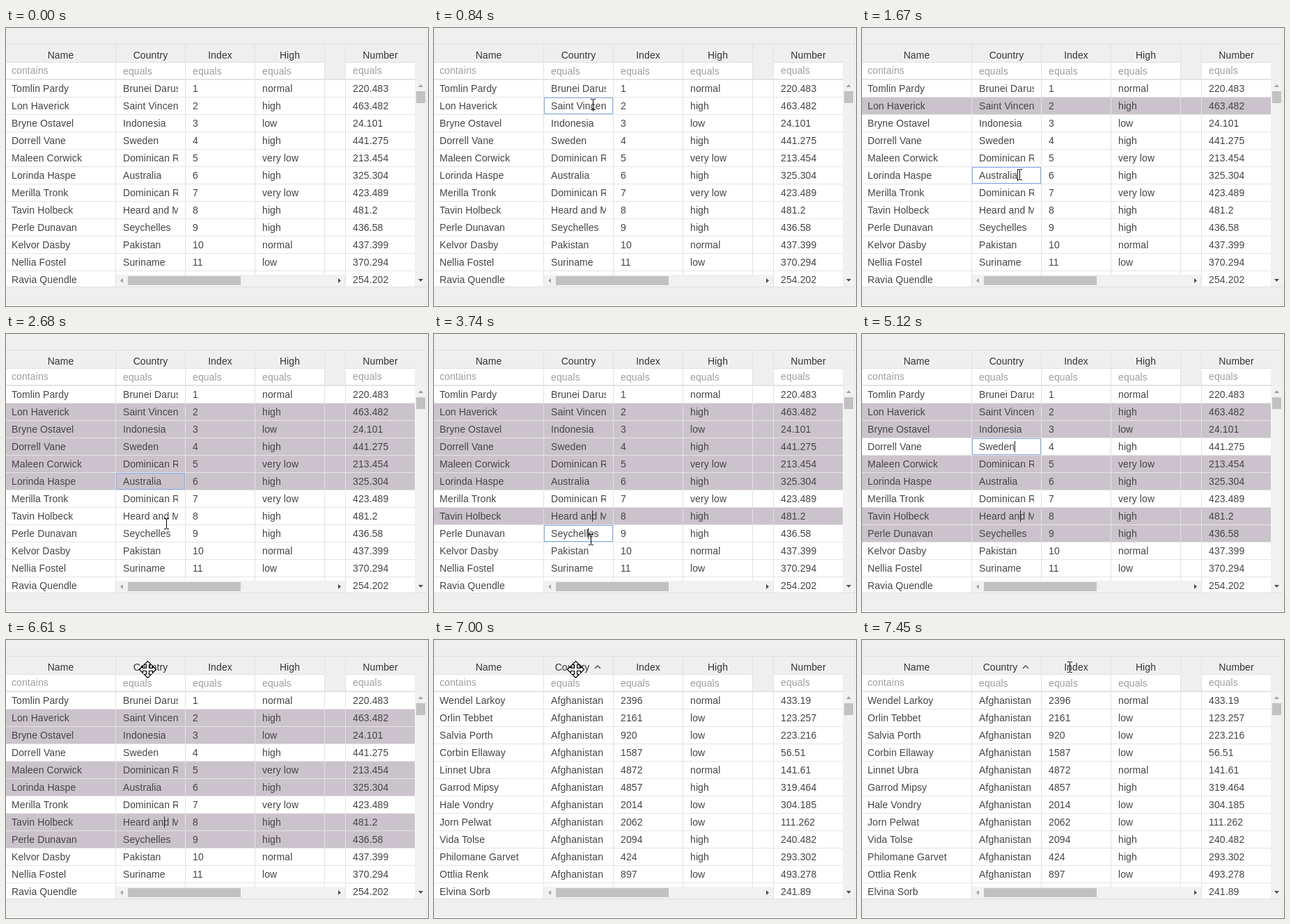
These frames come from a looping animation (606 by 400 pixels, 8000 ms). An HTML page:

```html
<!DOCTYPE html>
<html lang="en">
<head>
<meta charset="utf-8">
<title>Grid row selection</title>
<style>
html, body { margin: 0; width: 100%; height: 100%; overflow: hidden; background: #fff; }
#stage { position: relative; width: 606px; height: 400px; overflow: hidden; background: #fff;
  font: 14px/24px "Liberation Sans", Arial, sans-serif; letter-spacing: .1px; color: #444; cursor: default; }
#stage div, #stage svg { position: absolute; box-sizing: border-box; }
.text { white-space: pre; overflow: hidden; height: 24px; }
.title { text-align: center; color: #333; }
.filter { color: #9a9f9a; }
.row { left: 0; width: 587px; height: 25px; border-bottom: 1px solid #e4e4e4; background: #fff; }
.row.selected { background: #cbc3cc; }
#focus { left: 158px; width: 99px; height: 24px; border: 1px solid #82a9ee; }
.caret { width: 1px; height: 16px; background: #222; }
#move, #beam { overflow: visible; left: 0; top: 0; width: 1px; height: 1px; }
</style>
</head>
<body>
<div id="stage"></div>
<script>
const LOOP = 8000, SORT_AT = 7000, ROW_TOP = 75, ROW_H = 25;
const LINE = '#e0e0e0', PANEL = '#efefef';
const stage = document.getElementById('stage');

const columns = [
  { x: 0, w: 157, pad: 8, title: 'Name', filter: 'contains', filterTop: 49 },
  { x: 158, w: 99, pad: 10, title: 'Country', filter: 'equals', filterTop: 50 },
  { x: 258, w: 99, pad: 10, title: 'Index', filter: 'equals', filterTop: 50 },
  { x: 358, w: 99, pad: 10, title: 'High', filter: 'equals', filterTop: 50 },
  { x: 488, w: 99, pad: 10, title: 'Number', filter: 'equals', filterTop: 49 }
];

const parse = text => text.trim().split('\n').map(line => line.split('|'));
const unsorted = parse(`
Tomlin Pardy|Brunei Darussalam|1|normal|220.483
Lon Haverick|Saint Vincent and the Grenadines|2|high|463.482
Bryne Ostavel|Indonesia|3|low|24.101
Dorrell Vane|Sweden|4|high|441.275
Maleen Corwick|Dominican Republic|5|very low|213.454
Lorinda Haspe|Australia|6|high|325.304
Merilla Tronk|Dominican Republic|7|very low|423.489
Tavin Holbeck|Heard and McDonald Islands|8|high|481.2
Perle Dunavan|Seychelles|9|high|436.58
Kelvor Dasby|Pakistan|10|normal|437.399
Nellia Fostel|Suriname|11|low|370.294
Ravia Quendle||||254.202`);
const sorted = parse(`
Wendel Larkoy|Afghanistan|2396|normal|433.19
Orlin Tebbet|Afghanistan|2161|low|123.257
Salvia Porth|Afghanistan|920|low|223.216
Corbin Ellaway|Afghanistan|1587|low|56.51
Linnet Ubra|Afghanistan|4872|normal|141.61
Garrod Mipsy|Afghanistan|4857|high|319.464
Hale Vondry|Afghanistan|2014|low|304.185
Jorn Pelwat|Afghanistan|2062|low|111.262
Vida Tolse|Afghanistan|2094|high|240.482
Philomane Garvet|Afghanistan|424|high|293.302
Ottlia Renk|Afghanistan|897|low|493.278
Elvina Sorb||||241.89`);

// Timed states: row, start, end (and the caret's x)
const selections = [
  [1, 910, SORT_AT], [2, 1820, SORT_AT], [3, 1820, 4730], [4, 1820, SORT_AT],
  [5, 1820, SORT_AT], [7, 2910, SORT_AT], [8, 3810, SORT_AT]
];
const focuses = [[1, 840, 1670], [5, 1670, 2830], [7, 2830, 3660], [8, 3660, 4650], [3, 4650, 6610]];
const carets = [
  [1, 840, 1340, 228], [5, 1670, 2210, 223], [7, 2830, SORT_AT, 227],
  [8, 3660, 4110, 221], [3, 4650, 6610, 219]
];

// Pointer strokes: start, end, steps, target; "from" marks an entrance
const strokes = [
  { start: 70, end: 600, steps: 8, from: [433, 331], to: [228, 110] },
  { start: 980, end: 1370, steps: 6, to: [229, 222] },
  { start: 1445, end: 1520, steps: 2, to: [226, 211] },
  { start: 2210, end: 2680, steps: 7, to: [230, 273] },
  { start: 2990, end: 3430, steps: 7, to: [228, 304] },
  { start: 3510, end: 3580, steps: 2, to: [225, 296] },
  { start: 3890, end: 3960, steps: 2, to: [226, 313] },
  { start: 4110, end: 4430, steps: 5, to: [235, 168] },
  { start: 4880, end: 5040, steps: 3, to: [368, 315] },
  { start: 5910, end: 6370, steps: 7, from: [496, 358], to: [203, 42] },
  { start: 7300, end: 7450, steps: 3, to: [298, 39] }
];
const hiddenSpans = [[0, 70], [5120, 5910]];

function add(className, css, text = '', parent = stage) {
  const el = document.createElement('div');
  el.className = className;
  Object.assign(el.style, css);
  el.textContent = text;
  return parent.appendChild(el);
}
const px = n => n + 'px';
const box = (x, y, w, h, background) =>
  add('', { left: px(x), top: px(y), width: px(w), height: px(h), background });
const label = (kind, x, y, w, text) =>
  add('text ' + kind, { left: px(x), top: px(y), width: px(w) }, text);

function svg(id, content) {
  stage.insertAdjacentHTML('beforeend', `<svg id="${id}">${content}</svg>`);
  return document.getElementById(id);
}

const rows = unsorted.map((_, i) => {
  const el = add('row', { top: px(ROW_TOP + i * ROW_H) });
  const cells = columns.map(c => add('text', {
    left: px(c.x + c.pad), top: 0, width: px(c.w - 2 * c.pad)
  }, '', el));
  return { el, cells };
});

const focus = add('', {});
focus.id = 'focus';
const caretEls = carets.map(([row, , , x]) =>
  add('caret', { left: px(x), top: px(ROW_TOP + row * ROW_H + 4) }));

// Header, filters and footer
box(0, 0, 605, 75, PANEL);
for (const [x, w] of [[0, 157], [158, 299], [488, 99]]) {
  box(x, 49, w, 1, LINE);
  box(x, 50, w, 23, '#fff');
}
box(0, 23, 605, 1, LINE);
box(0, 73, 588, 2, '#e3e3e3');
for (const x of [157, 257, 357, 457, 487]) box(x, 24, 1, 348, '#e2e2e2');
const titles = columns.map(c => {
  label('filter', c.x + c.pad, c.filterTop, c.w - 2 * c.pad, c.filter);
  return label('title', c.x, 27, c.w, c.title);
});

// Scrollbars
box(158, 355, 329, 17, '#f1f1f1');
box(175, 357, 162, 13, '#c1c1c1');
box(587, 75, 17, 297, '#f1f1f1');
box(589, 91, 13, 17, '#c1c1c1');
box(0, 372, 605, 26, PANEL);
box(0, 372, 605, 1, LINE);
box(0, 397, 605, 1, LINE);
box(604, 0, 1, 398, LINE);
svg('arrows', `
  <path d="M592 85l3.5-4 3.5 4zM168 360v7l-4-3.5z" fill="#a3a3a3"/>
  <path d="M592 361l3.5 4 3.5-4zM477 360v7l4-3.5z" fill="#505050"/>`)
  .style.cssText = 'left:0;top:0;width:606px;height:400px';
const chevron = svg('chevron', '<path d="M1 5l4-4 4 4" fill="none" stroke="#444" stroke-width="1.3"/>');
chevron.style.cssText = 'left:230px;top:36px;width:10px;height:7px';

// Pointers
const beam = svg('beam', '<path d="M-3 -7.5h3m1 0h3M.5 -7v14M-3 7.5h3m1 0h3" fill="none" stroke="#000"/>');
const arm = [[-2, -2], [-2, -7], [-5, -7], [0, -12], [5, -7], [2, -7]];
const turn = ([x, y], n) => n ? turn([-y, x], n - 1) : [x, y];
const arms = [0, 1, 2, 3].flatMap(n => arm.map(p => turn(p, n))).join(' ');
const move = svg('move', `<polygon points="${arms}" fill="#fff" stroke="#000" stroke-width="1.2" transform="translate(.5 .5)"/>`);

const within = (t, start, end) => t >= start && t < end;
const show = (el, on) => { el.style.visibility = on ? 'visible' : 'hidden'; };

function pointerAt(t) {
  let pos = [0, 0];
  for (const { start, end, steps, from, to } of strokes) {
    if (t < start) break;
    const step = Math.min(steps - 1, Math.floor((t - start) / (end - start) * (steps - 1) + 1e-6));
    const p = from ? step / (steps - 1) : (step + 1) / steps;
    const eased = p * (1.4 - .4 * p);
    const origin = from || pos;
    pos = origin.map((v, i) => Math.round(v + (to[i] - v) * eased));
  }
  return pos;
}

let shownData;
function showData(data) {
  if (data === shownData) return;
  shownData = data;
  rows.forEach(({ cells }, i) => cells.forEach((cell, j) => { cell.textContent = data[i][j]; }));
  titles[1].style.left = px(data === sorted ? 149 : 158);
  show(chevron, data === sorted);
}

function render(t) {
  showData(t < SORT_AT ? unsorted : sorted);
  rows.forEach(({ el }, i) => el.classList.toggle('selected',
    selections.some(([row, start, end]) => row === i && within(t, start, end))));

  const focused = focuses.find(([, start, end]) => within(t, start, end));
  show(focus, focused);
  if (focused) focus.style.top = px(ROW_TOP + focused[0] * ROW_H);
  carets.forEach(([, start, end], i) => show(caretEls[i], within(t, start, end)));

  const [x, y] = pointerAt(t);
  const visible = !hiddenSpans.some(([start, end]) => within(t, start, end));
  const moving = y < 50 && t < 7450;
  show(beam, visible && !moving);
  show(move, visible && moving);
  beam.style.transform = move.style.transform = `translate(${x}px, ${y}px)`;
}

const origin = performance.now();
function tick() {
  render((performance.now() - origin) % LOOP);
  requestAnimationFrame(tick);
}
render(0);
requestAnimationFrame(tick);
</script>
</body>
</html>
```
